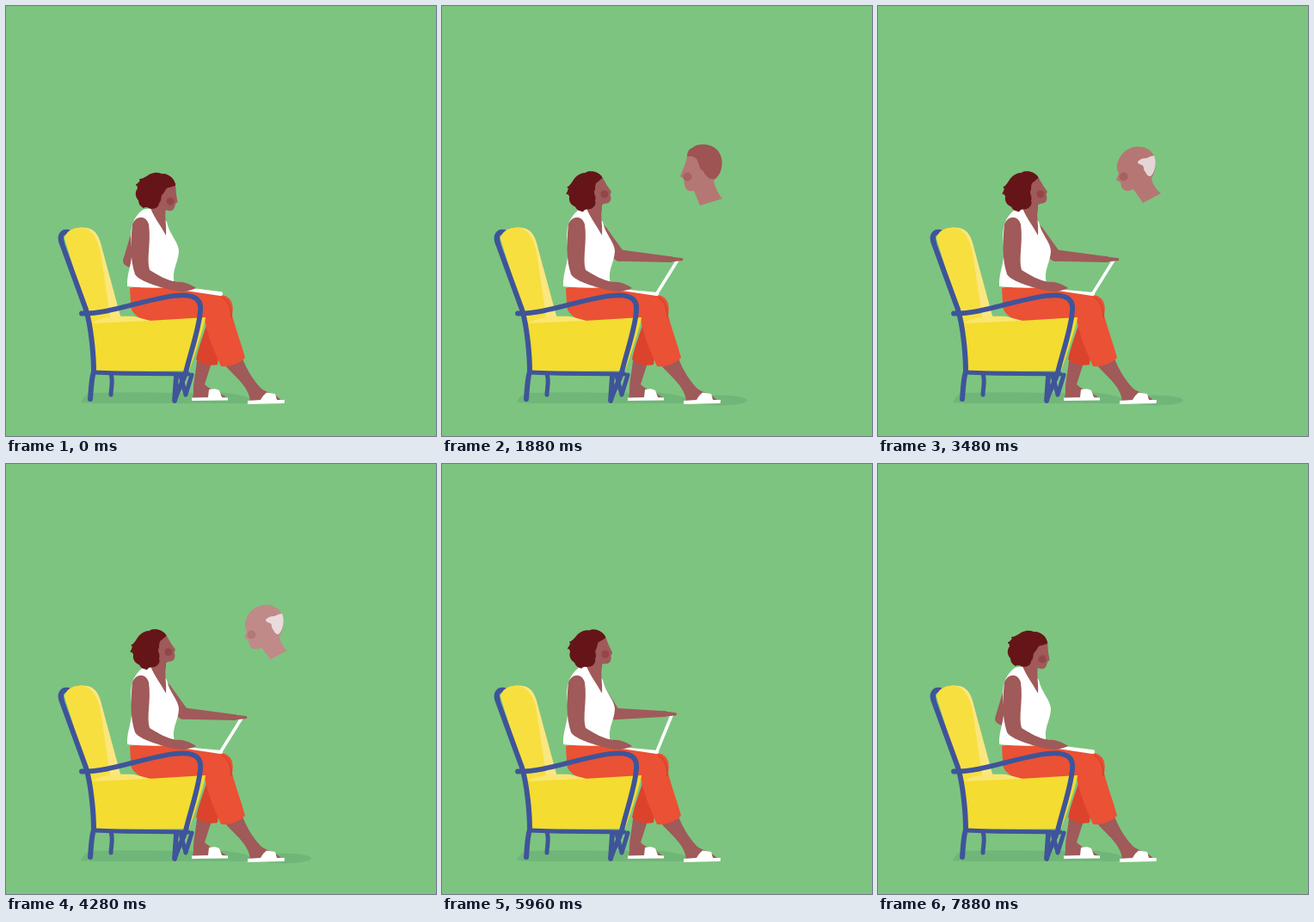
Write an HTML page with a canvas that moves like this. It is 500x500 px and loops after 7.92 s.

```html
<!DOCTYPE html>
<html lang="en">
<head>
<meta charset="utf-8">
<title>Imagined companion</title>
<style>
html, body { margin: 0; width: 100%; height: 100%; overflow: hidden; background: #7dc480; }
canvas { display: block; }
</style>
</head>
<body>
<canvas id="stage" width="500" height="500"></canvas>
<script>
const ctx = document.getElementById('stage').getContext('2d');
const LOOP = 7920;
const BG = '#7dc480', SHADE = '#70b678', SKIN = '#9f5a59', BLUE = '#3f5499', MAROON = '#651518';
const ORANGE = '#ea5135', GREEN = '#32a650', YELLOW = '#f4dc30', ROSE = '#b07064';
const WHITE = [255, 255, 255];

const lerp = (a, b, k) => a + (b - a) * k;
const ramp = (t, a, b) => Math.min(1, Math.max(0, (t - a) / (b - a)));
const ease = (t, a, b) => { const x = ramp(t, a, b); return x * x * (3 - 2 * x); };
const mix = (a, b, k) => a.map((v, i) => Math.round(lerp(v, b[i], k)));

function fill(path, color) {
  ctx.fillStyle = color;
  ctx.fill(new Path2D(path));
}
function stroke(path, color, width) {
  ctx.strokeStyle = color;
  ctx.lineWidth = width;
  ctx.lineCap = ctx.lineJoin = 'round';
  ctx.stroke(new Path2D(path));
}
function oval(x, y, rx, ry, color, turn = 0) {
  ctx.fillStyle = color;
  ctx.beginPath();
  ctx.ellipse(x, y, rx, ry, turn, 0, 7);
  ctx.fill();
}
// Blends two paths that share the same commands.
function morph(a, b, k) {
  const nums = b.match(/[\d.]+/g);
  let i = 0;
  return a.replace(/[\d.]+/g, n => lerp(+n, +nums[i++], k).toFixed(2));
}
function limb([ax, ay], [bx, by], wa, wb) {
  const d = Math.hypot(bx - ax, by - ay), nx = (ay - by) / d, ny = (bx - ax) / d;
  fill(`M${ax + nx * wa} ${ay + ny * wa}L${bx + nx * wb} ${by + ny * wb}L${bx - nx * wb} ${by - ny * wb}L${ax - nx * wa} ${ay - ny * wa}Z`, SKIN);
  oval(ax, ay, wa, wa, SKIN);
  oval(bx, by, wb, wb, SKIN);
}

// Successive looks of the imagined head: young, grown, old, pale
const FACES = [
  'M282 179 C283 184 281 187 281 189 L278 200 L282 203 L283 209 C284 215 288 217 294 216 L306 231 L327 222 C321 217 317 210 317 203 C323 196 325 180 321 172 C314 160 290 160 282 179Z',
  'M285 174 C284 181 282 185 281 188 L277 198 L281 201 L282 208 C283 214 287 216 293 215 L300 232 L326 224 C321 218 317 210 316 203 C325 196 327 180 322 172 C314 160 290 160 285 174Z',
  'M278 184 C277 189 279 192 280 195 L277 202 L282 205 L283 210 C285 216 292 216 297 213 L308 229 L329 218 C322 212 319 206 318 200 C324 192 324 177 319 171 C310 159 284 160 278 184Z',
  'M278 184 C277 189 279 192 280 195 L278 202 L282 205 L283 211 C285 216 292 216 297 216 L306 217 L313 211 C315 208 317 204 318 200 C323 192 323 177 318 172 C310 161 284 161 278 184Z'
];
const HAIR = [
  'M282 179 C279 173 282 165 288 163 C288 156 299 152 306 156 C315 153 324 160 323 167 C328 172 328 180 325 186 C324 191 322 195 319 199 C315 193 309 189 304 193 C300 192 301 182 297 178 C292 176 288 179 282 179Z',
  'M285 175 C285 170 287 166 291 165 C295 161 300 161 306 161 C314 162 321 166 323 172 C326 177 326 183 325 188 C324 194 321 199 317 201 C311 203 305 196 304 192 C299 190 300 186 297 180 C296 176 291 174 285 175Z',
  'M302 181 C303 180 304 179 306 178 C308 177 310 177 312 177 C316 175 319 174 321 174 C323 179 323 183 322 188 C321 193 319 196 317 198 C314 198 312 196 311 193 C308 191 310 186 307 185 C305 184 302 184 302 181Z'
];
const BEARD = 'M283 204 C288 201 290 208 294 206 C299 203 299 197 299 189 L303 193 C303 207 299 214 293 216 C286 217 282 211 283 204Z';

// x, y, half length, half width, turn, colour
const PILLS = [
  [334, 156, 5.8, 3, -.9, YELLOW], [242, 182, 2.5, 2, .3, YELLOW],
  [263, 153, 3, 2.8, 0, GREEN], [342, 167, 3, 2.8, 0, GREEN],
  [273, 228, 4.5, 3.5, -.5, GREEN], [279, 228, 3.5, 4, 0, GREEN],
  [287, 227, 3.8, 3, 1.2, BLUE], [340, 234, 3, 2.2, .6, BLUE],
  [298, 139, 3.6, 1.8, 1.3, ROSE], [258, 210, 3.4, 1.7, .2, ROSE],
  [349, 195, 3.6, 1.8, -.2, ROSE], [327, 249, 3.4, 1.8, 1.1, ROSE]
];
const HEARTS = [[268, 180, 1.1, -.4], [319.5, 158, 1.05, .3], [331, 202, .9, -.4]];

let seed = 11;
const rand = () => (seed = seed * 16807 % 2147483647) / 2147483647;

// A jittered grid pulled inside the outline of the pale head
function makeShards() {
  const cols = 6, rows = 8, grid = [], shards = [];
  const reach = (x, y) => Math.hypot((x - 299) / 22, (y - 191) / 28);
  for (let r = 0; r <= rows; r++) for (let c = 0; c <= cols; c++) {
    const x = 273 + c * 8 + r % 2 * 4 + (rand() - .5) * 7, y = 163 + r * 7 + (rand() - .5) * 9;
    const k = Math.max(1, reach(x, y));
    grid.push([299 + (x - 299) / k, 191 + (y - 191) / k]);
  }
  for (let r = 0; r < rows; r++) for (let c = 0; c < cols; c++) {
    const i = r * (cols + 1) + c;
    const pts = [grid[i], grid[i + 1], grid[i + cols + 2], grid[i + cols + 1]];
    const x = pts.reduce((s, p) => s + p[0], 0) / 4, y = pts.reduce((s, p) => s + p[1], 0) / 4;
    if (reach(x, y) < .95)
      shards.push({ x, y, pts, start: 5130 - (y - 165) * 4.5 - (x - 280) * 2.5 + rand() * 90 });
  }
  return shards;
}
const shards = makeShards();

const floorBit = (x, y, k) => oval(338 + (x - 300) * .45, 460 + (y - 200) * .12, 3 * k, 1.5 * k, SHADE);

function drawFloor(t, pop) {
  fill('M87 461 C89 455 94 450 102 450 C150 448 200 451 245 449 C262 450 285 454 292 460 L280 462 L100 462Z', SHADE);
  const size = pop * (1 - ease(t, 4850, 5080));
  oval(322, 458.5, 33 * size, 6 * size, SHADE);
}

function drawChairBack() {
  stroke('M73 263 C64 261 62 269 65 276', BLUE, 6);
  fill('M68 270 C71 259 85 256 94 258 C105 260 109 269 112 283 L134 364 L99 368Z', '#fbe77f');
  fill('M68 270 C71 259 82 257 90 258 C102 261 107 273 110 287 L122 367 L99 370Z', '#f8df40');
  stroke('M122 428 C125 437 122 444 122 452', BLUE, 5);
}

function drawChairFront() {
  fill('M98 369 C115 364 150 363 166 366 L232 362 C231 372 218 410 213 424 L104 425Z', YELLOW);
  fill('M100 369 C112 361 132 360 149 361 L168 366Z', '#fae670');
  stroke('M64 269 C64 273 64 274 66 279 L93 353 C99 373 102 406 102 425 C99 435 99 446 98 457', BLUE, 6);
  stroke('M103 426 C140 428 175 427 212 428', BLUE, 5);
  stroke('M88 357.5 C118 358 150 345 186 338.5 C211 334 228 336 226 354 C225 374 215 401 209 426 C205 440 199 447 196 459 L198 430', BLUE, 5.8);
  stroke('M203 430 L209 452 L216 429', BLUE, 5);
}

function drawLegs() {
  fill('M222 412 C221 425 217 440 218 450 L217 456 L257 456 C250 449 236 446 231 440 L239 415Z', SKIN);
  fill('M216 455.5 L235 455 L236 446 C240 445 245 445 248 447 L251 455 L258 455.5 L258 458.5 L216 459Z', '#fff');
  fill('M254 417 C267 432 282 442 284 459 L320 459 C316 452 304 450 297 445 C289 437 281 425 275 410Z', SKIN);
  fill('M281 459 L296 458 C298 454 301 451 303 449.5 L313 451 L315 458 L324 458 L323.5 462 L281 463Z', '#fff');
  fill('M236 360 C232 378 224 394 221 411 C228 417 238 419 246 417 L253 360Z', '#dc432c');
  fill('M144 328 C165 323 195 325 217 330 L255 337 C263 341 265 348 263 360 C268 378 274 394 278 409 C271 416 260 420 250 419 C243 403 234 383 231 364 L166 367 C153 363 144 356 145 346Z', ORANGE);
  stroke('M252 339 C261 344 262 354 262 362', '#db432c', 2);
}

function drawFarArm(open, tip) {
  const shoulder = [lerp(153, 185, open), lerp(265, 262, open)];
  const elbow = [lerp(143, 206, open), lerp(296, 290, open)];
  const wrist = [tip[0] - 9, tip[1] - lerp(5, 0, open)];
  limb(shoulder, elbow, 7.5, 6.8);
  limb(elbow, wrist, 6.8, 3.4);
  return wrist;
}

function drawTorso() {
  fill('M159 237 L172 235 L187 251 C189 264 201 275 201 285 C200 299 194 305 195 317 L196 327 C178 328 160 328 141 326 C140 310 148 298 146 281 C143 260 147 246 159 237Z', '#fff');
  fill('M166 235 L170 227 L186 227 L186 236 C184 244 187 256 186 267 C179 258 170 247 166 235Z', SKIN);
  fill('M159 237 L168 235 C173 248 182 258 187 269 L184 268 C176 259 168 248 159 237Z', '#fff');
}

function drawHead(look) {
  ctx.save();
  ctx.translate(176 + 4 * look, 238 - 3 * look);
  ctx.rotate(-.44 * look);
  ctx.translate(-176, -238);
  fill('M173 226 L184 210 L197 207 L198 219 L199.5 228 L197 230 L196 234 C194 239 190 239 186 237 L178 238Z', SKIN);
  oval(191, 227, 4.5, 4.5, '#934649');
  fill('M197 209 C196 199 188 195 181 195 C174 192 166 195 163 199 C156 201 151 207 153 212 C149 217 151 223 154 226 C154 232 159 235 164 234 C170 238 178 235 178 229 C182 226 179 220 183 218 C186 214 186 211 190 211Z', MAROON);
  stroke('M166 198 C162 199 161 202 156 202 M158 205 C155 205 154 207 152 208 M156 226 C155 230 157 232 160 234 M184 196 C190 198 194 201 196 207', MAROON, 2);
  ctx.restore();
}

function drawLaptop(tip) {
  fill('M207 329 L251 333 C253 335 252 337 249 337 L209 331Z', '#fff');
  stroke(`M250 334 L${tip[0]} ${tip[1]}`, '#fff', 3.6);
}

function drawNearArm() {
  fill('M147 254 C151 243 163 243 166 254 C169 275 163 294 167 307 C178 314 188 319 198 321 C206 320 215 324 221 328 C215 331 204 333 196 331 C178 327 155 320 150 312 C144 294 145 272 147 254Z', SKIN);
}

function drawGhost(t, pop) {
  if (!pop || t > 4900) return;
  const grow = ease(t, 1250, 1620), age = ease(t, 2500, 3300), pale = ease(t, 4150, 4700);
  const stage = pale ? 2 : age ? 1 : 0, k = pale || age || grow;
  const tint = rgb => `rgb(${mix(rgb, WHITE, pale)})`;
  ctx.save();
  ctx.translate(303, 198);
  ctx.scale(pop, pop);
  ctx.translate(-303, -198);
  fill(morph(FACES[stage], FACES[stage + 1], k), tint([181, 119, 116]));
  oval(285.5, 198.5, 5, 5, tint([166, 97, 97]));
  const hair = age ? morph(HAIR[1], HAIR[2], age) : morph(HAIR[0], HAIR[1], grow);
  fill(hair, tint(mix([157, 84, 82], [230, 213, 214], age)));
  if (grow < 1) {
    ctx.globalAlpha = 1 - grow;
    fill(BEARD, '#9d5452');
  }
  ctx.restore();
}

function drawConfetti(t) {
  const spread = ease(t, 600, 900) + .04 * ramp(t, 900, 1200);
  const size = ramp(t, 600, 780) * (1 - ease(t, 1020, 1400));
  if (size <= 0) return;
  const at = (x, y) => [303 + (x - 303) * spread, 198 + (y - 198) * spread];
  for (const [px, py, rx, ry, turn, color] of PILLS) {
    const [x, y] = at(px, py);
    oval(x, y, rx * size, ry * size, color, turn);
    floorBit(x, y, size);
  }
  for (const [px, py, s, turn] of HEARTS) {
    const [x, y] = at(px, py);
    ctx.save();
    ctx.translate(x, y);
    ctx.rotate(turn);
    ctx.scale(s * size, s * size);
    fill('M0 7 C-4 4 -8 1 -7 -3 C-6 -7 -1 -7 0 -3.5 C1 -7 6 -7 7 -3 C8 1 4 4 0 7Z', ORANGE);
    ctx.restore();
  }
}

function drawShards(t) {
  if (t <= 4900 || t > 5600) return;
  const gap = lerp(1, .84, ramp(t, 4880, 5040));
  for (const { x, y, pts, start } of shards) {
    const u = ramp(t, start, start + 480), s = gap * (1 - u), drop = 45 * u * u;
    if (s <= 0) continue;
    floorBit(x + (x - 300) * .6, y + drop, s * .8);
    ctx.fillStyle = '#fff';
    ctx.beginPath();
    for (const [px, py] of pts) ctx.lineTo(x + (px - x) * s, y + drop + (py - y) * s);
    ctx.fill();
  }
}

function draw(t) {
  const open = ease(t, 60, 660) - ease(t, 5760, 6880);
  const look = .62 * ease(t, 250, 880) + .38 * ease(t, 860, 1200) - ease(t, 5660, 6440);
  const pop = ease(t, 600, 900);
  const angle = lerp(187, 302, open) * Math.PI / 180;
  const tip = [250 + 46.5 * Math.cos(angle), 334 + 46.5 * Math.sin(angle)];

  ctx.fillStyle = BG;
  ctx.fillRect(0, 0, 500, 500);
  drawFloor(t, pop);
  drawChairBack();
  const wrist = drawFarArm(open, tip);
  drawLegs();
  drawTorso();
  drawHead(look);
  drawLaptop(tip);
  limb(wrist, [tip[0] + lerp(2, 4, open), tip[1] - lerp(1, 0, open)], 3, 1.6);
  drawNearArm();
  drawChairFront();
  drawGhost(t, pop);
  drawConfetti(t);
  drawShards(t);
}

const begin = performance.now();
function tick() {
  draw((performance.now() - begin) % LOOP);
  requestAnimationFrame(tick);
}
tick();
</script>
</body>
</html>
```
